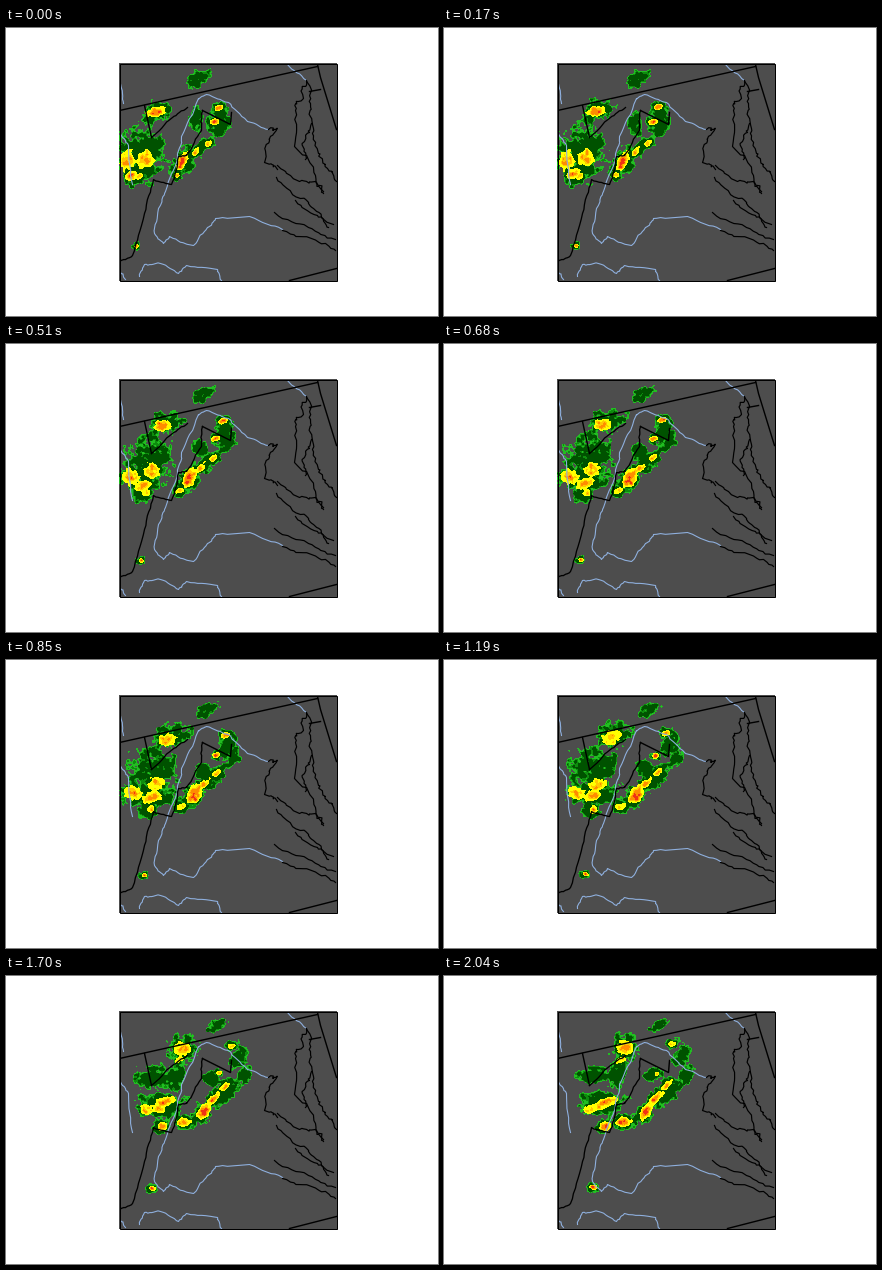
Write a matplotlib script that moves like this. It is 432 by 288 pixels and loops after 2.21 s.

```python
import numpy as np
import matplotlib.pyplot as plt
from matplotlib.animation import FuncAnimation
from matplotlib.patches import Rectangle

W, H = 432, 288
X0, Y0, SIZE = 113, 35, 218
FRAMES, STEP = 13, 170

RIVER = "#8fb0de"
PALETTE = np.array([plt.matplotlib.colors.to_rgb(c) for c in (
    "#4d4d4d", "#22be22", "#0e8c0e", "#005200",
    "#ffff00", "#ffc800", "#ff8c00", "#f03214")])

# Each echo: tilt, then (x, y, half length, half width) at the start,
# sometimes the middle, and the end. Cores add their peak strength.
RAIN_NORTH = [
    (30, (193, 50, 13, 8), (214, 49, 10, 5)),
    (15, (151, 84, 15, 10), (165, 76, 20, 12), (180, 72, 14, 14)),
    (70, (212, 92, 15, 12), (238, 80, 13, 8)),
    (90, (190, 91, 12, 7), (196, 112, 8, 8), (211, 98, 7, 11)),
]
RAIN_WEST = [
    (0, (134, 126, 24, 28), (146, 112, 24, 24), (151, 98, 18, 8)),
    (0, (126, 118, 16, 20), (144, 135, 29, 13), (158, 126, 21, 13)),
    (80, (150, 120, 14, 8), (172, 98, 16, 10)),
    (0, (125, 150, 10, 10), (160, 149, 9, 8)),
]
RAIN_BAND = [
    (50, (178, 132, 18, 11), (198, 138, 15, 9)),
    (45, (197, 118, 13, 6), (220, 118, 19, 10)),
    (10, (172, 145, 5, 4), (180, 146, 12, 7)),
    (60, (214, 100, 8, 8), (241, 97, 11, 8)),
]
CORE_NORTH = [
    (10, (149, 84, 9, 5, .8), (180, 72, 8, 9, .6)),
    (30, (156, 80, 5, 3, .4), (177, 83, 5, 3, .7)),
    (20, (212, 80, 5, 3, .7), (228, 67, 4, 3, .6)),
    (10, (208, 93, 5, 3, .8), (213, 97, 2, 2, .5)),
]
CORE_WEST = [
    (80, (121, 132, 11, 8, .6), (127, 132, 7, 10, .65), (147, 132, 5, 7, .6)),
    (15, (138, 131, 9, 9, .7), (150, 123, 9, 6, .6), (162, 126, 11, 5, .75)),
    (10, (125, 147, 6, 5, .6), (145, 137, 10, 6, .7), (153, 130, 7, 4, .6)),
    (45, (133, 148, 4, 3, .6), (161, 149, 6, 5, .9)),
    (0, (130, 218, 2, 2, .6), (149, 211, 4, 3, 1.1)),
]
CORE_BAND = [
    (60, (176, 132, 10, 5, 1.1), (189, 132, 11, 7, 1), (201, 136, 10, 5, 1)),
    (45, (190, 123, 5, 3, .7), (211, 122, 12, 4, .9)),
    (45, (202, 115, 4, 3, .7), (222, 109, 8, 3, .75)),
    (10, (170, 147, 2, 2, .4), (180, 145, 9, 5, .95)),
]
RAIN = RAIN_NORTH + RAIN_WEST + RAIN_BAND
CORES = CORE_NORTH + CORE_WEST + CORE_BAND

rng = np.random.default_rng(8)
ys, xs = np.mgrid[Y0:Y0 + SIZE, X0:X0 + SIZE] + 0.0


def smooth_noise(sigma):
    k = np.fft.fftfreq(SIZE)
    low_pass = np.exp(-2 * (np.pi * sigma) ** 2 * (k[:, None] ** 2 + k ** 2))
    field = np.fft.ifft2(np.fft.fft2(rng.normal(size=(SIZE, SIZE))) * low_pass).real
    return field / field.std()


def texture():
    return 0.75 * smooth_noise(1.1) + 0.65 * smooth_noise(3)


NOISE_A, NOISE_B = texture(), texture()


def noise_at(i):
    """Texture that drifts north-east with the storms and slowly evolves."""
    mixed = np.cos(0.17 * i) * NOISE_A + np.sin(0.17 * i) * NOISE_B
    return np.roll(mixed, (-round(0.4 * i), round(1.6 * i)), axis=(0, 1))


def pose(keys, i):
    times = (0, 5, 12) if len(keys) == 3 else (0, 12)
    return [np.interp(i, times, values) for values in zip(*keys)]


def dome(tilt, x, y, a, b):
    """One in the centre, zero on the rim of a tilted ellipse."""
    c, s = np.cos(np.radians(tilt)), np.sin(np.radians(tilt))
    u = (xs - x) * c - (ys - y) * s
    v = (xs - x) * s + (ys - y) * c
    return 1 - (u / a) ** 2 - (v / b) ** 2


def radar(i):
    rain = np.full((SIZE, SIZE), -9.0)
    core = rain.copy()
    for tilt, *keys in RAIN:
        rain = np.maximum(rain, dome(tilt, *pose(keys, i)))
    for tilt, *keys in CORES:
        x, y, a, b, peak = pose(keys, i)
        core = np.maximum(core, peak * dome(tilt, x, y, a, b))
        rain = np.maximum(rain, dome(tilt, x, y, a + 3, b + 3))
    noise = noise_at(i)
    light = np.digitize(rain + 0.32 * noise, (0, 0.24, 0.42))
    heavy = np.digitize(core + 0.2 * np.roll(noise, 40, axis=1), (0.03, 0.48, 0.7, 0.95))
    return PALETTE[np.where(heavy > 0, heavy + 3, light)]


def roughen(points, amount, rounds):
    """Midpoint displacement, for wiggly banks and shores."""
    pts = np.array(points, float)
    for _ in range(rounds):
        mids = (pts[1:] + pts[:-1]) / 2 + rng.uniform(-amount, amount, (len(pts) - 1, 2))
        out = np.empty((2 * len(pts) - 1, 2))
        out[::2], out[1::2] = pts, mids
        pts, amount = out, amount * 0.7
    return pts


RIVERS = [
    [(262, 101), (241, 93), (222, 74), (200, 66), (192, 70), (175, 108), (171, 128),
     (159, 163), (152, 180), (148, 205), (157, 215), (163, 208), (187, 217),
     (201, 199), (209, 190), (243, 188), (276, 201)],
    [(133, 248), (138, 236), (154, 235), (172, 245), (180, 237), (211, 241), (215, 252)],
    [(281, 36), (300, 52)],
    [(113, 102), (122, 117), (126, 156)],
    [(113, 242), (119, 251)],
    [(113, 53), (117, 75)],
]
BORDERS = [
    [(113, 82), (311, 38)],
    [(311, 36), (314, 49), (330, 101)],
    [(283, 252), (330, 240)],
    [(138, 77), (145, 109)],
    [(303, 63), (314, 61)],
    [(225, 84), (224, 96), (196, 82)],
]
RIDGES = [
    [(145, 109), (166, 89), (181, 79)],
    [(196, 82), (195, 102), (180, 127), (172, 128), (165, 156), (147, 151),
     (138, 185), (126, 227), (113, 233)],
]
BAY = [
    [(262, 101), (270, 101), (263, 112), (258, 134), (271, 141)],
    [(300, 52), (297, 70), (289, 82), (288, 118), (309, 147), (317, 163)],
    [(300, 52), (304, 75), (307, 100), (312, 125), (321, 140), (330, 153)],
    [(305, 95), (298, 113), (299, 131)],
]
INLETS = [
    [(271, 137), (293, 153), (309, 153), (317, 165)],
    [(270, 149), (294, 170), (307, 180), (327, 196)],
    [(289, 172), (311, 187), (322, 199)],
    [(268, 184), (302, 199), (329, 211)],
    [(276, 202), (305, 210), (329, 222)],
]

fig = plt.figure(figsize=(W / 72, H / 72), dpi=72, facecolor="white")
ax = fig.add_axes([0, 0, 1, 1])
ax.axis("off")
picture = ax.imshow(radar(0), extent=(X0, X0 + SIZE, Y0 + SIZE, Y0),
                    interpolation="nearest", aspect="auto")
ax.set_xlim(0, W)
ax.set_ylim(H, 0)
frame = ax.add_patch(Rectangle((X0 + .5, Y0 + .5), SIZE - 1, SIZE - 1,
                               fill=False, ec="black", lw=1, zorder=5))


def draw_lines(paths, color, width, amount=0, rounds=0):
    for path in paths:
        pts = roughen(path, amount, rounds) + 0.5
        line, = ax.plot(*pts.T, color=color, lw=width, solid_joinstyle="round")
        line.set_clip_path(frame)


draw_lines(RIVERS, RIVER, 1.1, 1.3, 3)
draw_lines(BORDERS, "black", 1.4)
draw_lines(RIDGES, "black", 1.3, 1.2, 3)
draw_lines(BAY, "black", 1.2, 3.2, 3)
draw_lines(INLETS, "black", 1.2, 2.2, 3)


def update(i):
    picture.set_data(radar(i))
    return [picture]


anim = FuncAnimation(fig, update, frames=FRAMES, interval=STEP, repeat=True)
plt.show()
```
